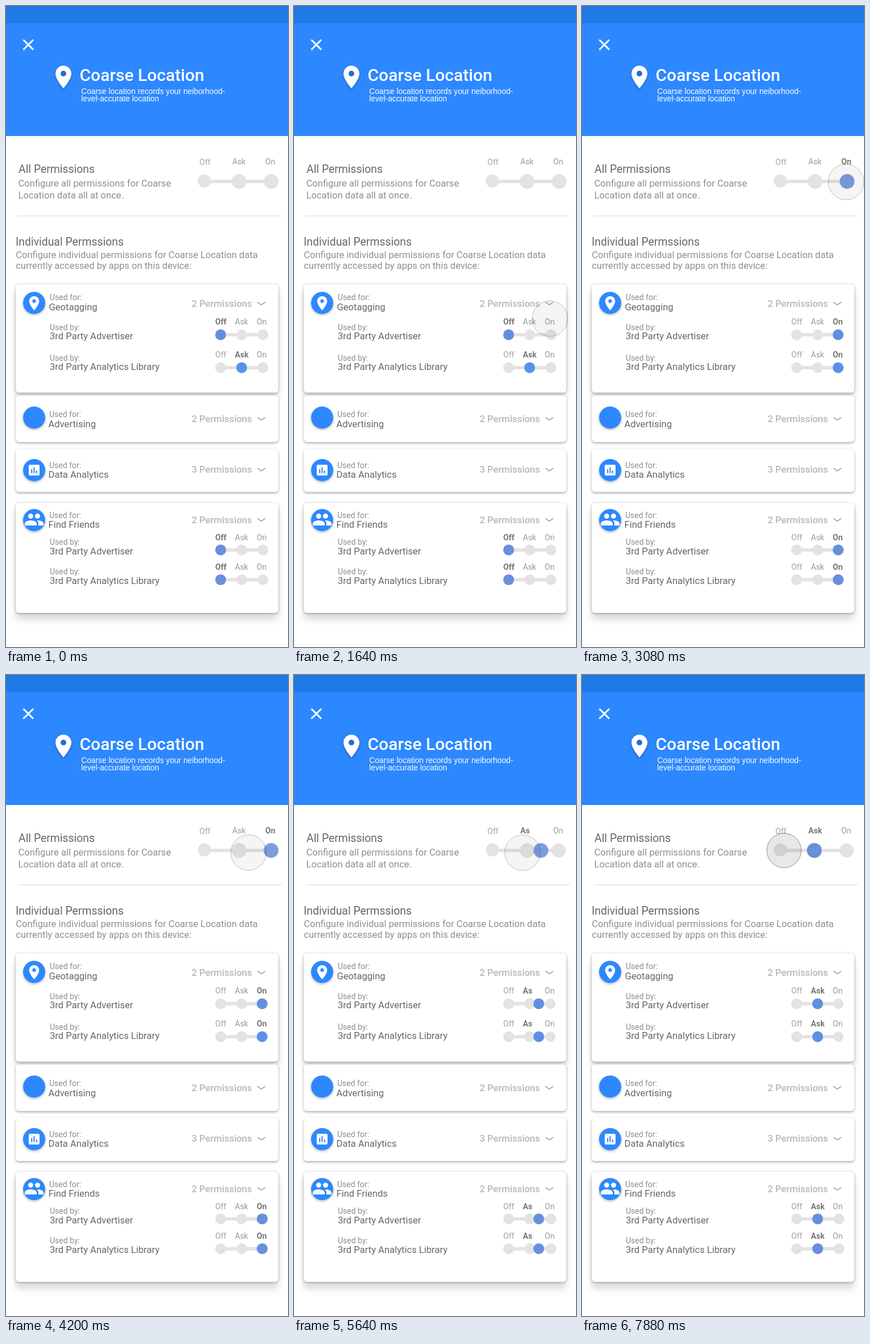
Animation, 496 px wide and 1129 px high, one loop 8000 ms. Source, as an HTML page:

```html
<!DOCTYPE html>
<html lang="en">
<head>
<meta charset="utf-8">
<title>Coarse Location</title>
<style>
html, body { margin: 0; width: 100%; height: 100%; overflow: hidden; background: #fff; }
svg { display: block; width: 100%; height: 100%; font-family: Roboto, sans-serif; }
.deep { filter: drop-shadow(0 1px 2px #0005) drop-shadow(0 12px 6px #0002); }
.thin { filter: drop-shadow(0 2px 2px #0005); }
.icon { filter: drop-shadow(0 2px 2px #0004); }
</style>
</head>
<body>
<svg id="stage" viewBox="0 0 496 1129" xmlns="http://www.w3.org/2000/svg"></svg>
<script>
const BLUE = '#2d88ff', GREY = '#e3e3e3';
const PIN = 'M12 2C8.13 2 5 5.13 5 9c0 5.25 7 13 7 13s7-7.75 7-13c0-3.87-3.13-7-7-7z';
const PEOPLE = 'M16 11c1.66 0 2.99-1.34 2.99-3S17.66 5 16 5s-3 1.34-3 3 1.34 3 3 3zm-8 0c1.66 0 2.99-1.34 2.99-3S9.66 5 8 5 5 6.34 5 8s1.34 3 3 3zm0 2c-2.33 0-7 1.17-7 3.5V19h14v-2.5c0-2.33-4.67-3.5-7-3.5zm8 0c-.29 0-.62.02-.97.05 1.16.84 1.97 1.97 1.97 3.45V19h6v-2.5c0-2.33-4.67-3.5-7-3.5z';
const NAMES = ['Off', 'Ask', 'On'];

const text = (x, y, str, size = 16.6, fill = '#666', more = '') =>
  `<text x="${x}" y="${y}" font-size="${size}" fill="${fill}" ${more}>${str}</text>`;
const rect = (x, y, w, h, fill, more = '') =>
  `<rect x="${x}" y="${y}" width="${w}" height="${h}" fill="${fill}" ${more}/>`;
const dot = (x, y, r, fill, more = '') =>
  `<circle cx="${x}" cy="${y}" r="${r}" fill="${fill}" ${more}/>`;
const icon = (x, y, scale, body) =>
  `<g transform="translate(${x} ${y}) scale(${scale}) translate(-12 -12)" fill="#fff">${body}</g>`;
const pin = (x, y, scale, hole) =>
  icon(x, y, scale, `<path d="${PIN}"/>${dot(12, 9, 2.5, hole)}`);

function card(y, h, cls, iconY, art, forY, title, titleX, titleY, count, countY) {
  return rect(17, y, 462, h, '#fff', `rx="6" class="${cls}"`) +
    dot(49.5, iconY, 19.5, BLUE, 'class="icon"') + art +
    text(titleX + 1.5, forY, 'Used for:', 14, '#8e8e8e') +
    text(titleX, titleY, title) +
    text(326.5, countY, count + ' Permissions', 16.6, '#b8b8b8', 'font-weight="500"') +
    `<path d="M442.5 ${countY - 8}l6.7 5 6.7-5" fill="none" stroke="#888" stroke-width="1.3"/>`;
}
const user = (y, nameY, name) =>
  text(77, y, 'Used by:', 14, '#8e8e8e') + text(77, nameY, '3rd Party ' + name);

// Each slider: stops, label positions, first selected stop (-1 for none)
const small = { stops: [377.5, 414.5, 452], on: 450.5, labels: [368, 402.5, 441], r: [9.5, 9.5, 9.5] };
const sliders = [
  { stops: [349, 410, 466.5], on: 466.3, ask: 408.5, labels: [340.3, 398, 456], r: [11.5, 13, 13],
    y: 309, labelY: [280, 278.5, 278.5], start: -1, fill: '#688fdb', shift: 1 },
  { ...small, y: 579, labelY: [561, 561, 561], start: 0, fill: '#638edf', shift: 1 },
  { ...small, y: 637, labelY: [619, 619, 619], start: 1, fill: '#5c90e8', shift: 1 },
  { ...small, y: 958, labelY: [940.5, 940.5, 940.5], start: 0, fill: '#688fdb', shift: 0 },
  { ...small, y: 1010.5, labelY: [992.5, 992.5, 992.5], start: 0, fill: '#688fdb', shift: 0 }
];

const fixed =
  rect(0, 0, 496, 229, BLUE) + rect(0, 0, 496, 30, '#2078e6') +
  '<path d="M30.500 59.500l17.500 17.500m0-17.500l-17.500 17.500" stroke="#fff" stroke-width="3"/>' +
  `<g class="icon">${pin(101, 125, 2, '#1f6fd2')}</g>` +
  text(129.500, 132, 'Coarse Location', 30, '#fff', 'font-weight="500"') +
  ['Coarse location records your neiborhood-', 'level-accurate location'].map((s, i) =>
    text(132.3, 154.5 + i * 13.5, s, 13.75, '#fff',
      'font-family="Liberation Sans, Arial, sans-serif"')).join('') +
  text(22, 293.5, 'All Permissions', 19.4) +
  text(21.5, 317.5, 'Configure all permissions for Coarse', 16.6, '#8e8e8e') +
  text(21.5, 339, 'Location data all at once.', 16.6, '#8e8e8e') +
  rect(21, 369, 464, 1.3, '#e2e2e2') +
  text(17, 421.5, 'Individual Permssions', 19.4) +
  text(17.3, 444, 'Configure individual permissions for Coarse Location data', 16.55, '#8e8e8e') +
  text(17.3, 463, 'currently accessed by apps on this device:', 16.55, '#8e8e8e') +
  card(490, 191, 'deep', 523, pin(49.5, 523.5, 1.26, BLUE), 518, 'Geotagging', 75.5, 536, 2, 529.5) +
  user(571, 587, 'Advertiser') + user(624.5, 641, 'Analytics Library') +
  card(686, 82, 'thin', 725, '', 723.5, 'Advertising', 74.5, 742, 2, 732.5) +
  card(780, 76, 'thin', 817.5, icon(49.5, 817.5, 1.06,
    rect(3, 3, 18, 18, '#fff', 'rx="2"') +
    `<path d="M8 10v7M12 7v10M16 13v4" stroke="${BLUE}" stroke-width="2"/>`),
    813.5, 'Data Analytics', 74.5, 831, 3, 822) +
  card(875, 194, 'deep', 905.5, icon(49.5, 904.5, 1.5, `<path d="${PEOPLE}"/>`),
    901.5, 'Find Friends', 74.5, 919, 2, 910.5) +
  user(949, 966, 'Advertiser') + user(1001, 1018, 'Analytics Library');

const stage = document.getElementById('stage');
stage.innerHTML = fixed + '<g id="live"></g>';
const live = document.getElementById('live');

const mix = (a, b, p) => a + (b - a) * p;
const part = (t, start, length) => Math.min(1, Math.max(0, (t - start) / length));
const easeOut = (p, n = 2) => 1 - (1 - p) ** n;
const bezier = (a, b, c, d, u) =>
  a * (1 - u) ** 3 + 3 * b * u * (1 - u) ** 2 + 3 * c * u * u * (1 - u) + d * u ** 3;

function slider(s, t) {
  const on = easeOut(part(t, 2720, 360)), ask = easeOut(part(t, 5520, 360));
  const chosen = ask ? 1 : on ? 2 : s.start;
  const typed = ask || on || 1;
  let out = rect(s.stops[0], s.y - 3, s.stops[2] - s.stops[0], 6, GREY);
  s.stops.forEach((x, i) => {
    const moved = i === 2 && on ? s.shift : 0;
    out += dot(x - moved, i || s.start >= 0 ? s.y : s.y - 1, s.r[i] - moved / 2, GREY);
    const bold = i === chosen;
    const label = bold ? NAMES[i].slice(0, Math.ceil(NAMES[i].length * typed)) : NAMES[i];
    out += text(s.labels[i], s.labelY[i], label, 14, bold ? '#777' : i ? '#999' : '#a3a3a3',
      bold ? 'font-weight="700"' : '');
  });
  if (chosen >= 0) {
    const from = s.start < 0 ? s.on : s.stops[s.start];
    const x = mix(mix(from, s.on, on), s.ask || s.stops[1], ask);
    const alpha = s.start < 0 ? mix(on * .84, 1, ask ** 3) : 1;
    out += dot(x, s.y, s.r[2], s.fill, `opacity="${alpha}"`);
  }
  return out;
}

function pointer(t) {
  let x, y;
  if (t < 840 || (t >= 1120 && t < 1400)) return '';
  if (t < 1120) {
    // Sweeps in from the right edge, down and out again
    const k = (t - 840) / 40;
    x = [515, 480, 460, 465, 483.5, 505, 525][k];
    y = 80 + 66.6 * k + 2.79 * k * k;
  } else if (t < 2640) {
    const u = easeOut(part(t, 1360, 840));
    x = bezier(530, 438, 438, 462.8, u);
    y = bezier(935, 700, 450, 309, u);
  } else {
    const left = easeOut(part(t, 3840, 800), 1.55), off = easeOut(part(t, 7280, 240));
    x = mix(mix(464.4, 402, left), 355.3, off);
    y = mix(mix(310, 313, left) + Math.sin(left * Math.PI), 309, off);
  }
  const press = t >= 7880 ? 1 : t >= 7760 || (t >= 5400 && t < 5560) || (t >= 2600 && t < 2720) ? .5 : 0;
  return dot(x, y, 31.3 - press, '#000',
    `fill-opacity="${.04 + press * .05}" stroke="#000" stroke-opacity="${.25 + press * .15}"`);
}

function draw(now) {
  const t = Math.floor(now % 8000 / 40) * 40;
  live.innerHTML = sliders.map(s => slider(s, t)).join('') + pointer(t);
  requestAnimationFrame(draw);
}
draw(0);
</script>
</body>
</html>
```
